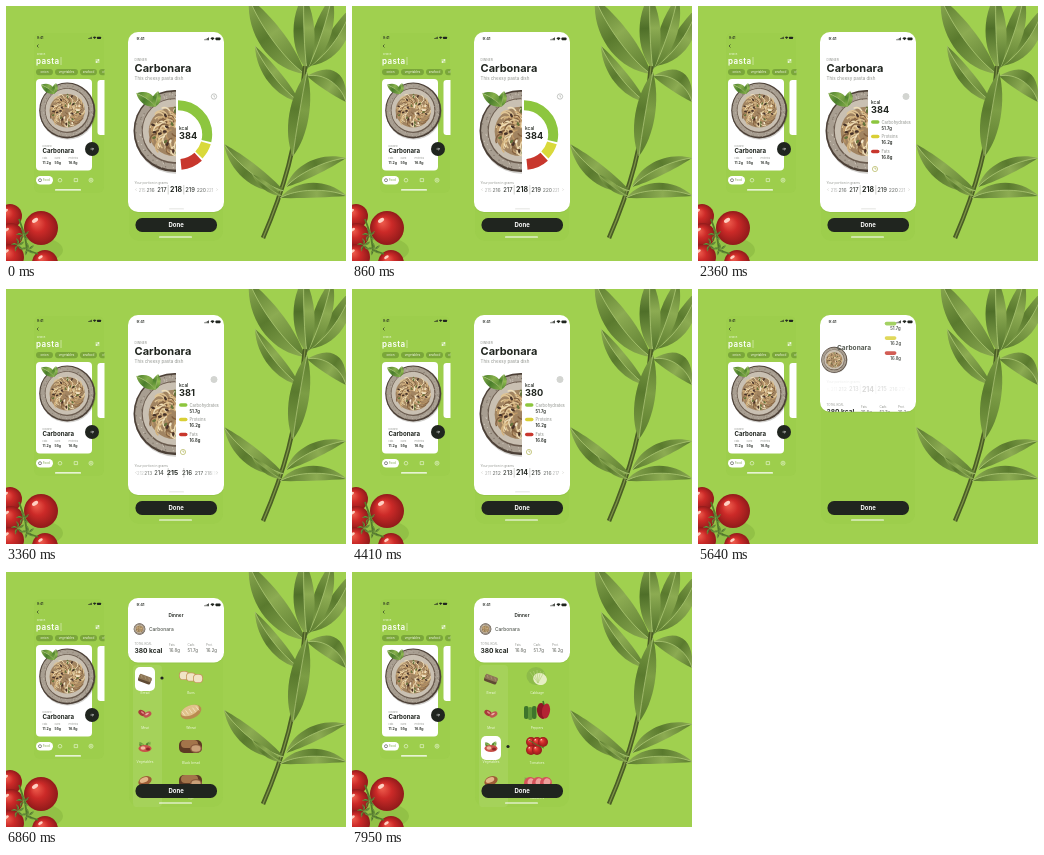
An HTML page with a canvas for the animation above (8 s loop, 340x255 px).

```html
<!DOCTYPE html>
<html lang="en">
<head>
<meta charset="utf-8">
<title>Recipe app</title>
<style>
html, body { margin: 0; width: 100%; height: 100%; overflow: hidden; background: #a0d04f; }
canvas { display: block; width: 340px; height: 255px; }
</style>
</head>
<body>
<canvas id="stage"></canvas>
<script>
const LOOP = 8000;
const GREEN = '#a0d04f', INK = '#20251f', GRAY = '#92958f';
const canvas = document.getElementById('stage');
const g = canvas.getContext('2d');
const dpr = Math.max(1, window.devicePixelRatio || 1);
canvas.width = 340 * dpr;
canvas.height = 255 * dpr;

const clamp = v => Math.min(1, Math.max(0, v));
const mix = (a, b, p) => a + (b - a) * p;
const inOut = p => p < .5 ? 4 * p ** 3 : 1 - 4 * (1 - p) ** 3;
const phase = (t, start, length) => inOut(clamp((t - start) / length));

function seeded(seed) {
  return () => (seed = (seed * 16807) % 2147483647) / 2147483647;
}

function group(draw, alpha = 1, dx = 0, dy = 0) {
  if (alpha <= 0) return;
  g.save();
  g.globalAlpha *= Math.min(1, alpha);
  g.translate(dx, dy);
  draw();
  g.restore();
}

function text(s, x, y, size, color = INK, weight = 400, align = 'left') {
  g.font = `${weight} ${size}px Inter, Arial, sans-serif`;
  g.textAlign = align;
  g.fillStyle = color;
  g.fillText(s, x, y);
}

function box(x, y, w, h, r, color) {
  g.beginPath();
  g.roundRect(x, y, w, h, r);
  g.fillStyle = color;
  g.fill();
}

function oval(x, y, rx, ry, color, turn = 0) {
  g.beginPath();
  g.ellipse(x, y, rx, ry, turn, 0, 7);
  g.fillStyle = color;
  g.fill();
}

function line(color, width, ...p) {
  g.beginPath();
  g.moveTo(p[0], p[1]);
  for (let i = 2; i < p.length; i += 2) g.lineTo(p[i], p[i + 1]);
  g.strokeStyle = color;
  g.lineWidth = width;
  g.stroke();
}

function ring(x, y, r, color, width = .6) {
  g.beginPath();
  g.arc(x, y, r, 0, 7);
  g.strokeStyle = color;
  g.lineWidth = width;
  g.stroke();
}

// A leaf from base to tip; bend pushes its middle sideways.
function leaf(x0, y0, x1, y1, width, bend = 0, dark = '#5a7a2e', light = '#8cab52') {
  const dx = x1 - x0, dy = y1 - y0, len = Math.hypot(dx, dy);
  const nx = -dy / len, ny = dx / len;
  const at = (k, off) => [x0 + dx * k + nx * off, y0 + dy * k + ny * off];
  const edge = side => [...at(.25, bend + side * width), ...at(.7, bend + side * width), x1, y1];
  const shade = (from, to) => {
    const fill = g.createLinearGradient(x0, y0, x1, y1);
    fill.addColorStop(0, from);
    fill.addColorStop(.55, to);
    fill.addColorStop(1, from);
    return fill;
  };
  const half = (side, color) => {
    g.beginPath();
    g.moveTo(x0, y0);
    g.bezierCurveTo(...edge(side));
    g.bezierCurveTo(...at(.7, bend), ...at(.25, bend), x0, y0);
    g.fillStyle = color;
    g.fill();
  };
  half(1, shade(dark, light));
  half(-1, shade(light, dark));
  g.beginPath();
  g.moveTo(x0, y0);
  g.bezierCurveTo(...edge(0));
  g.strokeStyle = '#a9c274';
  g.lineWidth = Math.min(.8, width * .08);
  g.stroke();
}

function plant() {
  leaf(304, 60, 346, 0, 12, 8);
  leaf(302, 62, 326, -10, 12, 3);
  leaf(301, 70, 340, 96, 14, -12);
  leaf(299, 68, 243, -8, 17, -8);
  leaf(301, 64, 298, -12, 14, -2, '#4f6f29');
  leaf(294, 96, 249, 40, 10, -6);
  g.beginPath();
  g.moveTo(257, 232);
  g.bezierCurveTo(276, 188, 292, 140, 299, 60);
  g.strokeStyle = '#4a5d25';
  g.lineWidth = 4.5;
  g.stroke();
  g.strokeStyle = '#7d9347';
  g.lineWidth = 1.2;
  g.stroke();
  leaf(287, 150, 301, 66, 13, -1, '#5a7a2e', '#7c9d45');
  leaf(278, 185, 218, 138, 12, -8);
  leaf(276, 190, 246, 168, 5, -2);
  leaf(280, 181, 340, 152, 10, -7);
  leaf(274, 192, 341, 190, 10, -9);
}

function tomato(x, y, r) {
  const shade = g.createRadialGradient(x - r * .3, y - r * .35, r * .1, x, y, r);
  shade.addColorStop(0, '#ea5648');
  shade.addColorStop(.4, '#cc2a28');
  shade.addColorStop(1, '#901a1a');
  oval(x, y, r, r, shade);
  oval(x - r * .35, y - r * .45, r * .2, r * .11, '#ffd0c2', -.6);
}

function tomatoes() {
  oval(30, 244, 27, 13, 'rgba(67,107,20,.15)');
  tomato(4, 210, 12);
  tomato(5, 229, 12);
  tomato(35, 222, 17);
  tomato(5, 251, 13);
  tomato(39, 257, 13);
  line('#547c2a', 1.8, 13, 213, 19, 230, 21, 244, 32, 248);
  for (const [x, y] of [[17, 229], [22, 243], [12, 239]]) {
    for (let i = 0; i < 5; i++) {
      const a = i * 1.26 + x;
      leaf(x, y, x + 7 * Math.cos(a), y + 7 * Math.sin(a), 1.4, 1, '#42672b', '#6c9237');
    }
  }
}

function plate(x, y, r) {
  const rnd = seeded(77);
  g.save();
  g.translate(x, y);
  g.scale(r, r);
  oval(.02, .04, 1, 1, 'rgba(50,45,35,.22)');
  oval(0, 0, 1, 1, '#4c4037');
  oval(-.01, -.01, .95, .95, '#a89e91');
  oval(0, 0, .8, .8, '#6a5b4e');
  oval(-.01, -.01, .765, .765, '#c9c0b2');
  for (let i = 0; i < 110; i++) {
    const a = rnd() * 6.28, d = .78 + rnd() * .16;
    oval(Math.cos(a) * d, Math.sin(a) * d, .014, .014, i % 2 ? '#75695d' : '#cfc7bb');
  }
  oval(0, .01, .63, .6, '#a18461');
  const noodles = ['#e0c594', '#bd9766', '#f0dfb8', '#82603f', '#d3b17c'];
  for (let i = 0; i < 95; i++) {
    const a = rnd() * 6.28, d = Math.sqrt(rnd()) * .5;
    g.beginPath();
    g.arc(Math.cos(a) * d, Math.sin(a) * d, .08 + rnd() * .1, a, a + 2 + rnd());
    g.strokeStyle = noodles[i % 5];
    g.lineWidth = .035;
    g.stroke();
  }
  for (let i = 0; i < 34; i++) {
    const a = rnd() * 6.28, d = Math.sqrt(rnd()) * .55;
    oval(Math.cos(a) * d, Math.sin(a) * d, .05, .03, ['#463228', '#f4e7c9', '#65733b'][i % 3], a);
  }
  group(() => {
    leaf(-.45, -.6, -.93, -.92, .2, .04, '#4a7d2c', '#86b04b');
    leaf(-.47, -.6, -.4, -.97, .13, 0, '#4f832e', '#8fba50');
  }, (r - 14) / 10);
  g.restore();
}

function statusBar(left, right, y, size) {
  text('9:41', left, y, size, INK, 600);
  const s = size / 4;
  for (let i = 0; i < 4; i++) box(right - 16 * s + i * 1.2 * s, y - (1 + i * .6) * s, .8 * s, (1 + i * .6) * s, 0, INK);
  g.beginPath();
  g.moveTo(right - 8 * s, y);
  g.arc(right - 8 * s, y, 3 * s, -2.35, -.8);
  g.fill();
  box(right - 5 * s, y - 2.8 * s, 5 * s, 2.7 * s, .7 * s, INK);
}

function searchPhone() {
  box(28, 27, 70, 160, 6, 'rgba(116,176,44,.08)');
  g.save();
  g.beginPath();
  g.roundRect(28, 27, 70.5, 160, 6);
  g.clip();
  statusBar(31, 95, 33, 3.2);
  line(INK, .6, 32.5, 38.5, 31, 40, 32.5, 41.5);
  text('search', 31, 49, 2.6, '#eef8df');
  g.letterSpacing = '.4px';
  text('pasta', 30, 57.5, 8, '#fff', 600);
  g.letterSpacing = '0px';
  line('#e6f4cd', .6, 55, 51, 55, 59);
  for (const y of [54, 56]) line('#fff', .7, 89.5, y, 93.5, y);
  oval(92.4, 54, .8, .8, '#fff');
  oval(90.6, 56, .8, .8, '#fff');
  [['onion', 30, 17], ['vegetables', 49, 23], ['seafood', 74, 17], ['cheese', 93, 17]].forEach(([s, x, w]) => {
    box(x, 63, w, 6.2, 3.1, '#7aa63a');
    text(s, x + w / 2, 67.1, 3, '#f4fae8', 400, 'center');
  });
  box(30, 73, 56, 91.5, 4, '#fff');
  box(91.5, 74, 14, 55, 3, '#fff');
  g.restore();
  plate(61.2, 104.5, 28);
  text('DINNER', 36.5, 140.5, 2.4, GRAY);
  text('Carbonara', 36.5, 147.2, 6.1, INK, 700);
  [['Fats', '11.2g', 36.5], ['Carb', '55g', 48.5], ['Proteins', '16.8g', 62.5]].forEach(([name, value, x]) => {
    text(name, x, 153, 2.5, GRAY);
    text(value, x, 157.8, 3.5, INK, 600);
  });
  oval(86, 143, 7, 7, INK);
  line('#fff', .6, 84.5, 143, 87.5, 143);
  line('#fff', .6, 86.3, 141.8, 87.5, 143, 86.3, 144.2);
  box(30, 170, 17, 8.5, 4.2, '#fff');
  ring(34, 174.2, 1.5, INK, .5);
  text('Food', 37, 175.3, 2.8, '#6e9d32');
  ring(54, 174.2, 1.8, '#eef8df');
  g.strokeRect(68.2, 172.6, 3.4, 3);
  ring(85, 174.2, 2, '#eef8df');
  ring(85, 174.2, .7, '#eef8df', .5);
  box(49, 183.3, 26, 1.2, .6, '#fff');
}

function calorieRing(left) {
  let from = -Math.PI / 2;
  [['#8dc63f', 105], ['#d9d93b', 31], ['#c8372d', 40]].forEach(([color, degrees], i) => {
    const sweep = degrees * Math.PI / 180 * left;
    const gap = Math.min(.03, sweep / 3);
    g.beginPath();
    g.arc(172, 128.5, i === 2 ? 30 : 29.2, from + (i ? gap : 0), from + sweep - gap);
    g.strokeStyle = color;
    g.lineWidth = i === 2 ? 11 : 10;
    g.stroke();
    from += sweep;
  });
}

const nutrients = [
  ['Carbohydrates', '51.7g', 116, '#8dc63f'],
  ['Proteins', '16.2g', 130.5, '#d9cf35'],
  ['Fats', '16.8g', 145.5, '#c8372d']
];

function legend(t, leave) {
  nutrients.forEach(([name, value, y, color], i) => {
    const show = phase(t, 1720 + i * 80, 400);
    group(() => {
      box(173 + 7 * leave, y - 1.8 + 3 * leave, mix(8.5, 13, leave), 3.6, 1.8, color);
      group(() => text(name, 183.5, y + 1.8, 4.2, GRAY), 1 - leave * 1.5);
      text(value, 183.5, y + 7.5 + 2 * leave, 4.2, INK, 600);
    }, show, 0, (1 - show) * 12);
  });
  group(() => {
    ring(177, 163, 2.6, '#a5a83d');
    line('#a5a83d', .6, 177, 161.4, 177, 163, 178.3, 163);
  }, phase(t, 1950, 350) - leave * 1.5);
}

function portionPicker(value) {
  text('Your portion in grams', 128.5, 177.6, 3.3, GRAY);
  for (let n = Math.ceil(value - 4); n <= value + 4; n++) {
    const d = n - value, a = Math.abs(d);
    const x = 170 + Math.sign(d) * (15.5 * a - 1.4 * a * a);
    const near = clamp(1 - a);
    const size = mix(mix(5.8, 4.2, clamp((a - 1) / 2)), 7, near);
    group(() => text(n, x, 185.6 + near * .6, size, INK, near > .5 ? 700 : 500, 'center'), clamp(1.2 - a * .3));
  }
  line('#a0a39c', .5, 162.2, 179, 162.2, 188.5);
  line('#a0a39c', .5, 177.8, 179, 177.8, 188.5);
  line('#c0c3bb', .5, 130.5, 182.5, 129.5, 183.6, 130.5, 184.7);
  line('#c0c3bb', .5, 210.5, 182.5, 211.5, 183.6, 210.5, 184.7);
}

function summary() {
  text('TOTAL KCAL', 128.5, 72.5, 2.9, GRAY);
  text('380 kcal', 128.5, 80.5, 6.6, INK, 700);
  [['Fats', '16.8g', 163], ['Carb.', '51.7g', 181.5], ['Prot.', '16.2g', 200]].forEach(([name, amount, x]) => {
    text(name, x, 74, 3, GRAY);
    text(amount, x, 80, 4.3, '#70736d', 500);
  });
}

function recipeCard(t, p) {
  const bottom = mix(206, 90.5, p);
  const q = 1 - (1 - p) ** 1.25;
  const up = phase(t, 1400, 520);
  const drag = phase(t, 2500, 1500);
  const tapped = phase(t, 1250, 200);
  box(122, 27, 96, bottom - 26, 10, 'rgba(75,115,25,.1)');
  box(122, 26, 96, bottom - 26, 10, '#fff');
  g.save();
  g.beginPath();
  g.roundRect(122, 26, 96, bottom - 26, 10);
  g.clip();

  g.save();
  g.beginPath();
  g.rect(122, 26, mix(48, 96, p), 180);
  g.clip();
  plate(mix(168.5, 133.5, 1 - (1 - p) ** 2), mix(125, 57, q), mix(41, 5.8, q));
  g.restore();

  group(() => {
    group(() => calorieRing(1 - phase(t, 1400, 360)), t < 1760 ? 1 : 0);
    const lift = -26 * up;
    text('kcal', 173, 124 + lift, 4.8, INK, 500);
    text(384 - Math.round(4 * drag), 173, 133 + lift, 9.2, INK, 700);
    legend(t, p);
  }, 1 - p ** 5, 12 * p, -116 * p);

  group(() => portionPicker(218 - 4 * drag), 1 - p * 1.15, 0, -116 * p);
  group(() => {
    text('DINNER', 128.5, 55.2, 3.3, GRAY);
    text('This cheesy pasta dish', 128.5, 74, 4.5, GRAY);
    ring(208, 90.5, 2.7, '#8d908a', .5);
    line('#8d908a', .5, 208, 89, 208, 90.6, 209.1, 91.2);
    group(() => oval(208, 90.5, 3.3, 3.3, '#d3d5d1'), tapped);
    box(163, 202.5, 15, .8, .4, '#d9dbd6');
  }, 1 - p * 2.5);

  text('Carbonara', mix(128.5, 143, p), mix(66, 59, p), mix(11, 4.9, p), p < .7 ? INK : '#555a52', p < .9 ? 700 : 500);
  group(() => text('Dinner', 170, 45.3, 4.7, INK, 600, 'center'), (p - .75) * 4);
  group(summary, clamp(p * 3 - .8), 0, 160 * (1 - p));
  statusBar(130.5, 214.5, 34.3, 4);
  g.restore();
}

// Small ingredient pictures, each drawn around the origin.
const foods = {
  loaf() {
    g.rotate(.35);
    box(-6.5, -2.5, 13, 6.5, 1.5, '#5f4a33');
    box(-6.5, -3.5, 13, 5, 1.5, '#8d7656');
    for (let i = -1; i < 2; i++) line('#b9a480', .5, i * 4 - 1, -2.5, i * 4 + 1, 0);
  },
  slices() {
    for (let i = 0; i < 3; i++) {
      box(-12 + i * 7, -5 + i * 1.5, 10, 9, 4, '#c4965c');
      box(-11.2 + i * 7, -4.3 + i * 1.5, 8.4, 7.6, 3.4, '#f1e4c6');
    }
  },
  bun() {
    oval(0, 1, 11, 6.5, '#b98b50', -.4);
    oval(-1, -.5, 9.5, 4.8, '#e0c28b', -.4);
    for (let i = -2; i < 3; i++) line('#f4e5c2', .9, i * 3.5 - 2, -2 - i * 1.3, i * 3.5 + 1, 2 - i * 1.3);
  },
  rye() {
    box(-12, -6, 23, 13, 5, '#5e3a24');
    box(-10, -6, 17, 8, 4, '#a3744a');
    oval(5, 2.5, 6, 4.5, '#8a5a3c');
    oval(5, 2.5, 4.6, 3.2, '#c9a078');
  },
  meat() {
    oval(-3, 0, 4, 2.6, '#a83a3a', .6);
    oval(2.5, 1.5, 4.2, 2.6, '#bf5450', -.5);
    oval(2, 1, 2, .9, '#eab5a6', -.5);
    oval(-2.5, -.5, 1.8, .8, '#e08f88', .6);
  },
  greens() {
    leaf(0, 2, -6, -4, 3, 0, '#477b29', '#86b547');
    leaf(1, 2, 5, -5, 3, 0, '#477b29', '#9bc859');
    oval(0, 2, 6.5, 3.4, '#c9534b');
    oval(-2, 1.5, 2.5, 1.7, '#f0b9a0');
    oval(3, 2.5, 2, 1.5, '#8f2527');
  },
  poultry() {
    oval(0, 0, 7, 4.5, '#9d5c36', -.4);
    oval(-1, -1, 4.5, 2.5, '#e3b688', -.4);
  },
  cabbage() {
    oval(-1, 0, 9.5, 9, '#8dbb4a');
    oval(3, 3, 7, 6, '#e6eec4', .3);
    for (let i = 0; i < 5; i++) line('#b6d27c', .6, 1, 7, -7 + i * 3.5, -6 + Math.abs(i - 2));
  },
  peppers() {
    for (let i = 0; i < 3; i++) box(-13 + i * 4, -5 + i % 2, 4.5, 13, 2, i % 2 ? '#5c9438' : '#3e752b');
    oval(5, 0, 5, 8, '#8f1725', -.15);
    oval(9, 0, 4, 7.5, '#b32433', .15);
    line('#3f7528', 1.5, 7, -6, 6, -10);
  },
  tomatoes() {
    for (let i = 0; i < 5; i++) tomato(-6 + (i % 3) * 6, i < 3 ? -4 : 4, 5);
    line('#4c7b2c', 1, -8, -6, 0, -1, 7, 2);
  },
  radish() {
    leaf(-6, 2, -13, -3, 3, 0, '#60943b', '#9bc859');
    for (let i = 0; i < 3; i++) {
      oval(-7 + i * 8, 2, 6, 6, '#d4525a', .3);
      oval(-6 + i * 8, 1, 3.4, 3.6, '#eea09c', .3);
    }
  }
};

function item(kind, label, x, y, labelY) {
  group(foods[kind], 1, x, y);
  text(label, x, labelY, 3.2, '#eef8dc', 400, 'center');
}

function ingredients(t) {
  const show = phase(t, 5880, 520);
  if (!show) return;
  const pick = phase(t, 7080, 420), scroll = phase(t, 7180, 520);
  const row = i => 104 + i * 35;
  g.save();
  g.beginPath();
  g.rect(122, 91, 96, 144);
  g.clip();
  group(() => {
    box(127, 93, 29, 142, 4, 'rgba(255,255,255,.08)');
    box(129, mix(95, 164, pick), 20, 24, 5, '#fff');
    oval(156, mix(106, 174.5, pick), 1.6, 1.6, INK);
    item('loaf', 'Bread', 139, 107, 121.8);
    item('meat', 'Meat', 139, 141, 156.5);
    item('greens', 'Vegetables', 139, 174.5, 191);
    item('poultry', 'Poultry', 139, 209, 225);
  }, show, 0, (1 - show) * 25);
  const bakery = [['slices', 'Buns'], ['bun', 'Wheat'], ['rye', 'Black bread'], ['rye', 'Rye']];
  const garden = [['cabbage', 'Cabbage'], ['peppers', 'Peppers'], ['tomatoes', 'Tomatoes'], ['radish', 'Radishes']];
  [bakery, garden].forEach((list, page) => {
    group(() => list.forEach(([kind, label], i) => item(kind, label, 185, row(i), row(i) + 17.8)),
      show * (page ? scroll : 1 - scroll), 0, (1 - show) * 40 + (page - scroll) * 140);
  });
  g.restore();
}

function recipePhone(t) {
  box(123, 30, 94, 205, 10, 'rgba(112,172,42,.08)');
  ingredients(t);
  recipeCard(t, phase(t, 5200, 750));
  const press = Math.sin(Math.PI * clamp((t - 5000) / 240));
  box(129.5 + press, 212 + press * .4, 81.5 - press * 2, 14 - press * .8, 6.5, INK);
  text('Done', 170.2, 221.2, 6, '#fff', 700, 'center');
  box(153, 230.4, 33, 1.2, .6, '#fff');
}

function frame(now) {
  const t = now % LOOP;
  g.setTransform(dpr, 0, 0, dpr, 0, 0);
  g.fillStyle = GREEN;
  g.fillRect(0, 0, 340, 255);
  g.lineJoin = 'round';
  searchPhone();
  tomatoes();
  plant();
  recipePhone(t);
}

const start = performance.now();
function tick() {
  frame(performance.now() - start);
  requestAnimationFrame(tick);
}
tick();
</script>
</body>
</html>
```
